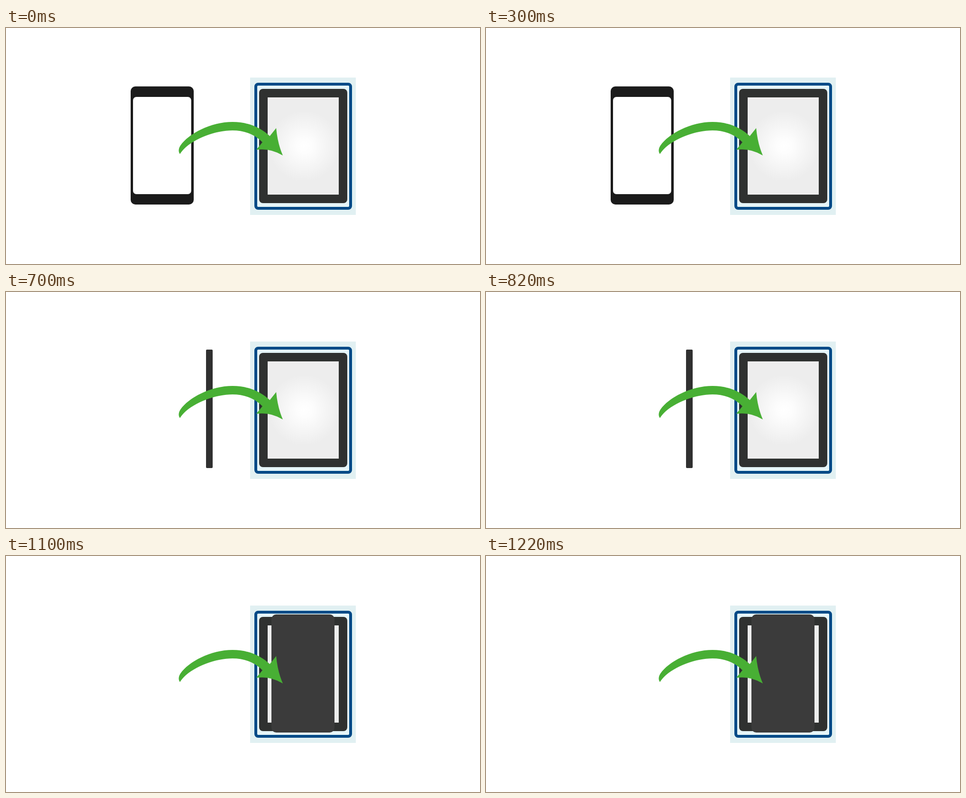
Recreate the animation shown at these times as an HTML page. Size 1000x500 px, loop 1300 ms.

```html
<!DOCTYPE html>
<html lang="en">
<head>
<meta charset="utf-8">
<title>Phone turning onto a reader</title>
<style>
  html, body { margin: 0; width: 100%; height: 100%; overflow: hidden; background: #fff; }
  svg { display: block; width: 100%; height: 100%; }
  .pose { visibility: hidden; }
</style>
</head>
<body>
<svg viewBox="0 0 1000 500">
  <defs>
    <radialGradient id="glow" gradientUnits="userSpaceOnUse" cx="629" cy="250" r="75">
      <stop offset="0" stop-color="#fff"/>
      <stop offset=".2" stop-color="#fdfdfd"/>
      <stop offset="1" stop-color="#ededed"/>
    </radialGradient>
    <path id="turned" d="M288 167Q288 157 297 154L403 126.200Q412 124 412 135V362Q412 374 402 378L300 404.500H295Q288 405 288 397Z"/>
  </defs>

  <!-- Reader -->
  <rect x="515" y="105" width="223" height="291" fill="#e1f0f2"/>
  <rect x="527" y="119" width="200" height="263" rx="5" fill="#e5f5f8" stroke="#004a87" stroke-width="6"/>
  <rect x="534" y="129" width="186" height="242" rx="8" fill="#2f3130"/>
  <rect x="552" y="147" width="150" height="206" fill="url(#glow)"/>

  <!-- Phone: front, half turned, edge, half turned back, back -->
  <g class="pose">
    <rect x="263" y="123.700" width="133" height="250.300" rx="10" fill="#1b1b1b"/>
    <rect x="268" y="146" width="122.700" height="206" rx="7" fill="#fff"/>
  </g>
  <g class="pose">
    <use href="#turned" fill="#3b3b3b"/>
    <path fill="#1b1b1b" d="M295 168Q295 157 304 154L403 126.700Q412 124 412 135V361Q412 373 402 376.500L303 403.500Q295 405 295 394Z"/>
    <path fill="#fff" d="M300 183Q300 176 306 174L401 149.300Q407 148 407 154V347Q407 353 401 355L306 380Q300 382 300 375Z"/>
  </g>
  <rect class="pose" x="422" y="122" width="14" height="251" rx="2" fill="#303030"/>
  <use class="pose" href="#turned" fill="#3b3b3b" transform="translate(865) scale(-1 1)"/>
  <rect class="pose" x="560" y="123.700" width="133" height="250.300" rx="10" fill="#3b3b3b"/>

  <path id="arrow" fill="#48af34" d="M367 267C363 262 364 255 368 249C385 224 432 199 478 199C511 199 537 211 556.500 229L570 212Q573 245 584 270Q558 254 528 258L541 242C524 225 503 217 478 217C436 217 383 240 367 267Z"/>
</svg>
<script>
  const LOOP = 1300;
  const poseEnds = [500, 700, 900, 1100, LOOP];
  const poses = document.querySelectorAll('.pose');
  const arrow = document.getElementById('arrow');
  const show = (element, on) => { element.style.visibility = on ? 'visible' : 'hidden'; };

  function draw() {
    const time = performance.now() % LOOP;
    const current = poseEnds.findIndex(end => time < end);
    poses.forEach((pose, i) => show(pose, i === current));
    show(arrow, current % 2 === 0);
    requestAnimationFrame(draw);
  }
  draw();
</script>
</body>
</html>
```
